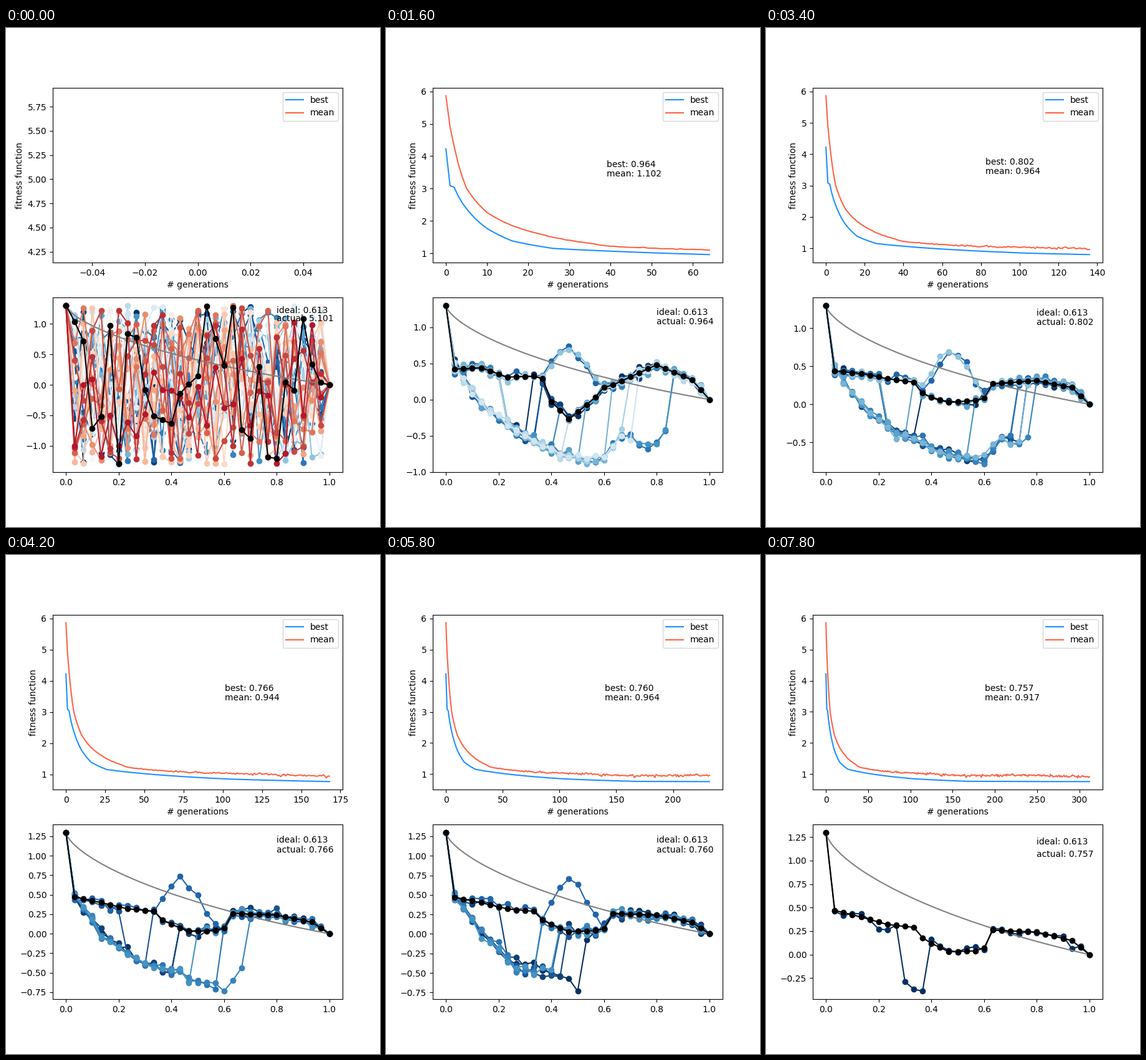
A matplotlib script that plays this animation: 600x800 px, repeating every 8000 ms.

```python
import matplotlib.pyplot as plt
import numpy as np
from matplotlib.animation import FuncAnimation

FRAMES, STEP = 40, 8          # each frame advances the search by 8 generations
N, TOP, SHADES = 31, 1.3, 30
X = np.linspace(0, 1, N)
IDX = np.arange(N)

# Fitness at a few generations, joined on a logarithmic time scale
GENS = [0, 1, 2, 5, 10, 16, 26, 40, 64, 104, 168, 232, 280, 312]
BEST = [4.221, 3.09, 3.04, 2.38, 1.77, 1.39, 1.155, 1.07, .964, .847,
        .766, .760, .757, .757]
MEAN = [5.862, 4.90, 4.30, 3.01, 2.26, 1.86, 1.50, 1.22, 1.102, 1.028,
        .944, .964, .924, .917]

# Best path at frames 8, 13 and 21, by a few of its vertices
LEAD_X = [1, 4, 7, 10, 11, 12, 14, 17, 18, 19, 24, 28]
LEAD_T = [8, 13, 21]
LEAD = [[.42, .44, .31, .32, .29, -.03, -.27, .03, .17, .20, .48, .27],
        [.40, .41, .35, .29, .11, .06, .02, .06, .09, .28, .38, .29],
        [.47, .40, .32, .29, .18, .12, .03, .04, .07, .26, .24, .15]]

# Lower branch early and late in the search
LOW_X = [1, 4, 8, 12, 16, 18, 20, 23, 25]
LOW_T = [8, 29]
LOW = [[.50, -.06, -.42, -.68, -.84, -.78, -.45, -.66, -.46],
       [.50, .02, -.26, -.32, -.50, -.60, -.45, -.30, -.30]]

# Size and depth of the population over the frames
POP_T = [0, 8, 13, 21, 29, 35, 39]
COUNT = [28, 13, 12, 7, 7, 4, 1]
FLOOR = [-1.3, -.893, -.84, -.737, -.733, -.492, -.389]


def history(values):
    gens = np.arange(STEP * (FRAMES - 1) + 1)
    return np.interp(np.log1p(gens), np.log1p(GENS), values)


def vertices(f, times, xs, rows):
    """Path through key vertices, eased in time between its rows."""
    now = [np.interp(f, times, col) for col in zip(*rows)]
    return np.interp(IDX, [0] + xs + [N - 1], [TOP] + now + [0])


def chaos(f):
    """Share of the random start that is left."""
    return max(0, 1 - f / 8) ** 2


def scatter(rng, y, f):
    w = chaos(f)
    y = (1 - w) * y + w * rng.uniform(-TOP, TOP, N)
    y[0], y[-1] = TOP, 0
    return y


def leader(f):
    y = vertices(f, LEAD_T, LEAD_X, LEAD)
    return scatter(np.random.default_rng(7), y, f)


def population(f, floor):
    rng = np.random.default_rng(100 + f)
    upper = vertices(f, LEAD_T, LEAD_X, LEAD)
    low = vertices(f, LOW_T, LOW_X, LOW)
    start = round(np.interp(f, [29, 35, 39], [1, 8, 9]))
    limit = round(np.interp(f, [13, 29, 35, 39], [26, 20, 19, 12]))
    paths = []
    for i in range(round(np.interp(f, POP_T, COUNT))):
        y = upper.copy()
        if i % 6 == 3:
            hump = .68 * np.exp(-((IDX - rng.uniform(13, 15)) / 3) ** 2)
            y = np.maximum(y, hump)
        else:
            last = rng.integers(max(start, 7) + 2, limit)
            first = min(start + rng.choice([0, 0, 0, 6]), last - 2)
            y[first:last + 1] = low[first:last + 1]
        paths.append(scatter(rng, y + rng.normal(0, .033, N), f))
    paths = np.array(paths)
    return np.where(paths < 0, paths * floor / paths.min(), paths)


def cycloid(h=TOP):
    """Curve of fastest descent from (0, h) to (1, 0)."""
    lo, hi = .1, 6
    for _ in range(50):
        t = (lo + hi) / 2
        if (1 - np.cos(t)) / (t - np.sin(t)) > h:
            lo = t
        else:
            hi = t
    a = h / (1 - np.cos(t))
    s = np.linspace(0, t, 100)
    return a * (s - np.sin(s)), h - a * (1 - np.cos(s))


best, mean = history(BEST), history(MEAN)
wobble = np.random.default_rng(4).normal(0, .02, mean.size)
wobble *= np.clip(np.arange(mean.size) / 130, 0, 1)
wobble[GENS] = 0
mean += wobble

fig, (ax_fit, ax_path) = plt.subplots(2, 1, figsize=(6, 8), dpi=100)
cmap = plt.get_cmap('RdBu_r')
ideal = cycloid()


def draw_fitness(g):
    n = g + 1
    ax_fit.clear()
    ax_fit.plot(best[:n], color='dodgerblue', label='best')
    ax_fit.plot(mean[:n], color='tomato', label='mean')
    ax_fit.set_xlabel('# generations')
    ax_fit.set_ylabel('fitness function')
    ax_fit.legend(loc='upper right')
    ax_fit.text(.6 * n, .87 * best[0], f'best: {best[g]:.3f}')
    ax_fit.text(.6 * n, .8 * best[0], f'mean: {mean[g]:.3f}')


def draw_paths(f, actual):
    floor = np.interp(f, POP_T, FLOOR)
    ax_path.clear()
    for i, y in enumerate(population(f, floor)):
        ax_path.plot(X, y, 'o-', color=cmap(i / SHADES))
    ax_path.plot(*ideal, color='gray')
    ax_path.plot(X, leader(f), 'o-', color='black')
    pad = .05 * (TOP - floor)
    ax_path.set_ylim(floor - pad, TOP + pad)
    ax_path.text(.8, .9 * TOP, 'ideal: 0.613')
    ax_path.text(.8, .8 * TOP, f'actual: {actual:.3f}')


def draw(f):
    g = STEP * f
    draw_fitness(g)
    draw_paths(f, best[g] if f else 5.101)
    return []


anim = FuncAnimation(fig, draw, frames=FRAMES, interval=200, repeat=True)
plt.show()
```
